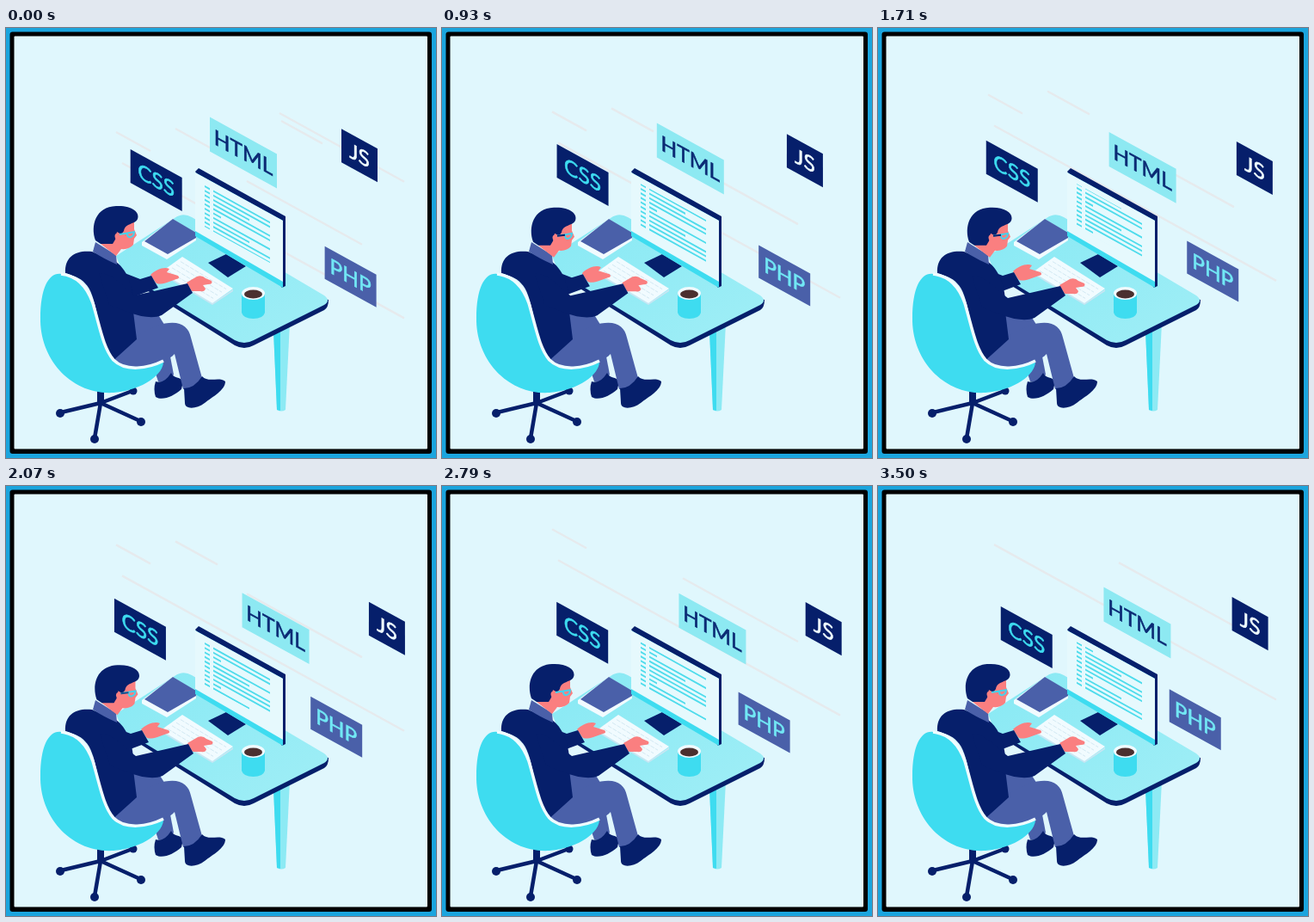
Animation of 500 by 500 pixels, one loop 3.57 s. Source, as an HTML page:

```html
<!DOCTYPE html>
<html lang="en">
<head>
<meta charset="utf-8">
<title>Developer at a desk</title>
<style>
  html, body { margin: 0; width: 100%; height: 100%; overflow: hidden; background: #e0f7fd; }
  svg { display: block; width: 100vw; height: 100vh; }
  text { font: 24.5px Lato, "Open Sans", sans-serif; text-anchor: middle; stroke-width: .6; }
  .navy { fill: #061f6b; }
  .slate { fill: #4a60a9; }
  .skin { fill: #fa7f80; }
  .cyan { fill: #3edcf0; }
  .pale { fill: #8deaf4; }
  .white { fill: #f1fbff; }
</style>
</head>
<body>
<svg viewBox="0 0 500 500">
  <defs>
    <clipPath id="page"><rect x="-2" y="0" width="86" height="50"/></clipPath>
    <linearGradient id="top" x1="0" y1="0" x2="1" y2="1">
      <stop offset="0" stop-color="#88e9f4"/>
      <stop offset="1" stop-color="#a0eef6"/>
    </linearGradient>
  </defs>

  <rect width="500" height="500" fill="#1ba5de"/>
  <rect x="4.500" y="4.500" width="490.500" height="490.500" rx="3"/>
  <rect x="9.500" y="9.500" width="480.500" height="480" rx="1" fill="#e0f7fd"/>

  <g id="streaks" stroke="#e6eaed" stroke-width="2.4"></g>

  <!-- desk -->
  <path class="pale" d="M311 352L330 343L325 444Q320 447 315 444Z"/>
  <path class="cyan" d="M311 352L319 349L319 445L315 444Z"/>
  <path class="navy" d="M135 287L266 369Q277 375 288 369L370 328Q375 325 375 316L300 300Z"/>
  <path fill="url(#top)" d="M196 221Q206 214 216 220L370 311Q378 317 370 322L288 363Q277 369 266 363L135 283L128 265Z"/>

  <!-- notebook -->
  <path class="white" d="M158 249L194 222L221 239V247L187 269L158 253Z"/>
  <path class="slate" d="M161 248L194 222L221 238V244L188 263Z"/>

  <!-- monitor -->
  <path class="navy" d="M235 273L256 263L279 277L258 290Z"/>
  <path class="navy" d="M220 167L224 163L325 219V300L321 302Z"/>
  <path class="cyan" d="M220 168L322 224V302L220 242Z"/>
  <path fill="#e6f9fd" d="M220 168L322 224V295L220 236Z"/>
  <g transform="matrix(1 .555 0 1 231 181)">
    <g clip-path="url(#page)"><g id="code" stroke="#4edcec" stroke-width="2.1"></g></g>
  </g>

  <!-- keyboard and cup -->
  <path fill="#c9e6f3" d="M180 284L240 320L264 304V306L240 322L180 286Z"/>
  <path class="white" d="M205 266L264 303L240 320L180 284Z"/>
  <g id="keys" stroke="#d3e9f3" stroke-width="1" stroke-dasharray="5 1.5"></g>
  <path class="cyan" d="M274 309V331Q276 338 287.500 338Q299 338 301 331V309Z"/>
  <ellipse class="white" cx="287.500" cy="308.500" rx="13.500" ry="7.500"/>
  <ellipse cx="287.500" cy="309.500" rx="10.500" ry="5" fill="#4b302f"/>

  <!-- far leg -->
  <path class="slate" d="M170 390L191 382L195 403Q188 413 177 411Z"/>
  <path class="navy" d="M174 411Q184 414 192 401C195 408 203 405 206 411L204 420C195 428 182 434 174 429Q171 420 174 411Z"/>

  <!-- body -->
  <path class="slate" d="M145 330L178 335L186 348L150 368Z"/>
  <path class="slate" d="M120 388C123 372 150 358 175 346C200 338 212 345 215 360L228 407Q217 421 206 420L196 379C190 386 178 389 165 394C150 400 130 400 120 388Z"/>
  <path class="navy" d="M207 419Q219 419 228 405C235 413 248 405 255 411C255 421 240 429 231 436C222 443 208 444 208 436Z"/>
  <g id="farArm">
    <path class="skin" d="M168 287C174 281 184 277 190 280L187 284L200 288Q203 291 198 292L187 296C180 298 176 298 174 296Z"/>
    <path class="navy" d="M120 278L156 292L169 288L177 302L150 312L122 305Z"/>
  </g>
  <path class="navy" d="M69 285C68 265 82 258 100 260L128 272C142 282 150 305 148 330L152 362L121 390C106 350 106 310 92 297C86 290 78 288 69 285Z"/>
  <g id="nearArm">
    <path class="skin" d="M210 296L222 289Q228 287 232 291L239 294Q241 298 235 298L229 299L232 303Q231 307 226 306L216 306Z"/>
    <path class="navy" d="M108 285C125 285 136 300 150 311L211 297L217 308L181 334C165 341 140 330 120 322Z"/>
  </g>
  <path class="slate" d="M104 249L120 259L128 264L129 275Q113 268 101 260Z"/>

  <g id="head">
    <path class="skin" d="M116 240L137 229L149 225L149 234L152 241L149 245L148 252Q143 258 134 257L128 265L110 251Z"/>
    <path class="navy" d="M104 247C98 230 104 208 128 207C146 206 156 214 153 222C150 229 139 226 137 236L134 240L129 237L127 246L124 251L110 251Z"/>
    <circle class="skin" cx="130" cy="242" r="3.500"/>
    <path d="M132 240L150 237M141 239Q141 244 145 243Q149 242 149 237" fill="none" stroke="#45d2ec" stroke-width="2"/>
    <path id="temple" d="M132 240L141 239" stroke="#061f6b" stroke-width="2"/>
  </g>

  <!-- chair -->
  <g stroke="#061f6b" stroke-width="4.500" stroke-linecap="round" fill="none">
    <path d="M110 420V438" stroke-width="8" stroke-linecap="butt"/>
    <path d="M110 436L64 447M110 436L147 422M110 436L156 457M110 436L103 477"/>
  </g>
  <g class="navy">
    <circle cx="63" cy="448" r="5"/><circle cx="148" cy="422" r="4.500"/>
    <circle cx="157" cy="458" r="5"/><circle cx="103" cy="478" r="5"/>
  </g>
  <path class="cyan" d="M40 337C40 302 50 284 64 286C84 288 95 303 101 320C109 347 113 372 125 386C139 400 165 396 183 387C184 402 160 421 125 424C76 427 39 385 40 337Z"/>
  <path d="M64 286C84 288 95 303 101 320C109 347 113 372 125 386C139 400 165 396 183 387" fill="none" stroke="#effcff" stroke-width="3.500"/>

  <g id="tags"></g>
</svg>
<script>
const LOOP = 3570, FPS = 14, SLOPE = 0.55, RISE = 0.0254;
const $ = id => document.getElementById(id);

function add(parent, name, attrs, label) {
  const el = document.createElementNS("http://www.w3.org/2000/svg", name);
  for (const k in attrs) el.setAttribute(k, attrs[k]);
  if (label) el.textContent = label;
  return parent.appendChild(el);
}

function ease(t, from, to) {
  const u = Math.min(Math.max((t - from) / (to - from), 0), 1);
  return u * u * (3 - 2 * u);
}

// Each tag swings along the slope: x, y is the middle, peak the time at the far right
const tags = [
  { label: "CSS", w: 60, h: 39, x: 135.5, y: 136, swing: -10, peak: 1870, period: 4300, bg: "#061f6b", ink: "#3edcf0" },
  { label: "HTML", w: 78, h: 40, x: 257, y: 114.5, swing: 20, peak: 2470, period: 5000, bg: "#8de9f2", ink: "#0b2a74" },
  { label: "JS", w: 42, h: 39, x: 407, y: 126.5, swing: 17, peak: 2470, period: 5000, bg: "#061f6b", ink: "#effcff" },
  { label: "PHP", w: 60, h: 38, x: 354.5, y: 245, swing: 16.5, peak: 250, period: 7200, bg: "#4a60a9", ink: "#72e8f5" }
];
for (const tag of tags) {
  tag.el = add($("tags"), "g", {});
  add(tag.el, "rect", { width: tag.w, height: tag.h, fill: tag.bg });
  add(tag.el, "text", { x: tag.w / 2, y: tag.h / 2 + 8.5, fill: tag.ink, stroke: tag.ink }, tag.label);
}

// Streaks rise together and vanish above a sloping ceiling
const streaks = [[128, 121, 40], [197, 117, 49], [135, 157, 328], [280, 178, 134], [318, 99, 145], [320, 108, 48]]
  .map(([x, y, w]) => ({
    life: (y - 39 - (x - 128) * 0.26) / RISE,
    el: add($("streaks"), "path", { d: `M${x} ${y}l${w} ${w * SLOPE}` })
  }));

for (let i = 0; i < 16; i++) {
  const len = i % 6 === 5 ? 9 : 66 - 24 * (i % 5 === 2);
  add($("code"), "path", { d: `M0 ${3 + i * 5.2}h6m4 0h${len}` });
}

for (let i = 1; i < 5; i++) {
  add($("keys"), "path", { d: `M${208 - i * 5} ${268 + i * 3.6}l53 32` });
}

const move = (el, x, y) => el.setAttribute("transform", `translate(${x} ${y})`);

function draw(t) {
  for (const { el, x, y, swing, peak, period } of tags) {
    const dx = swing * Math.cos(2 * Math.PI * (t - peak) / period);
    el.setAttribute("transform", `matrix(1 ${SLOPE} 0 1 ${x + dx} ${y + dx * SLOPE})`);
  }
  for (const { el, life } of streaks) {
    move(el, 0, -t * RISE);
    el.setAttribute("opacity", t < life ? 1 : 0);
  }
  move($("code"), 0, -t * 0.008);

  const nod = ease(t, 0, 800) - ease(t, 1850, 2500);
  move($("head"), 2 * nod, 1.8 * nod);
  $("temple").setAttribute("opacity", nod);

  const reach = ease(t, 500, 1400), lift = ease(t, 0, 500) - reach;
  move($("farArm"), -11 * reach, -4 * reach);
  move($("nearArm"), reach - 2 * lift, 3 * reach - 2 * lift);
}

function tick() {
  const t = performance.now() % LOOP;
  draw(Math.floor(t * FPS / 1000 + 0.07) * 1000 / FPS);
  requestAnimationFrame(tick);
}
tick();
</script>
</body>
</html>
```
